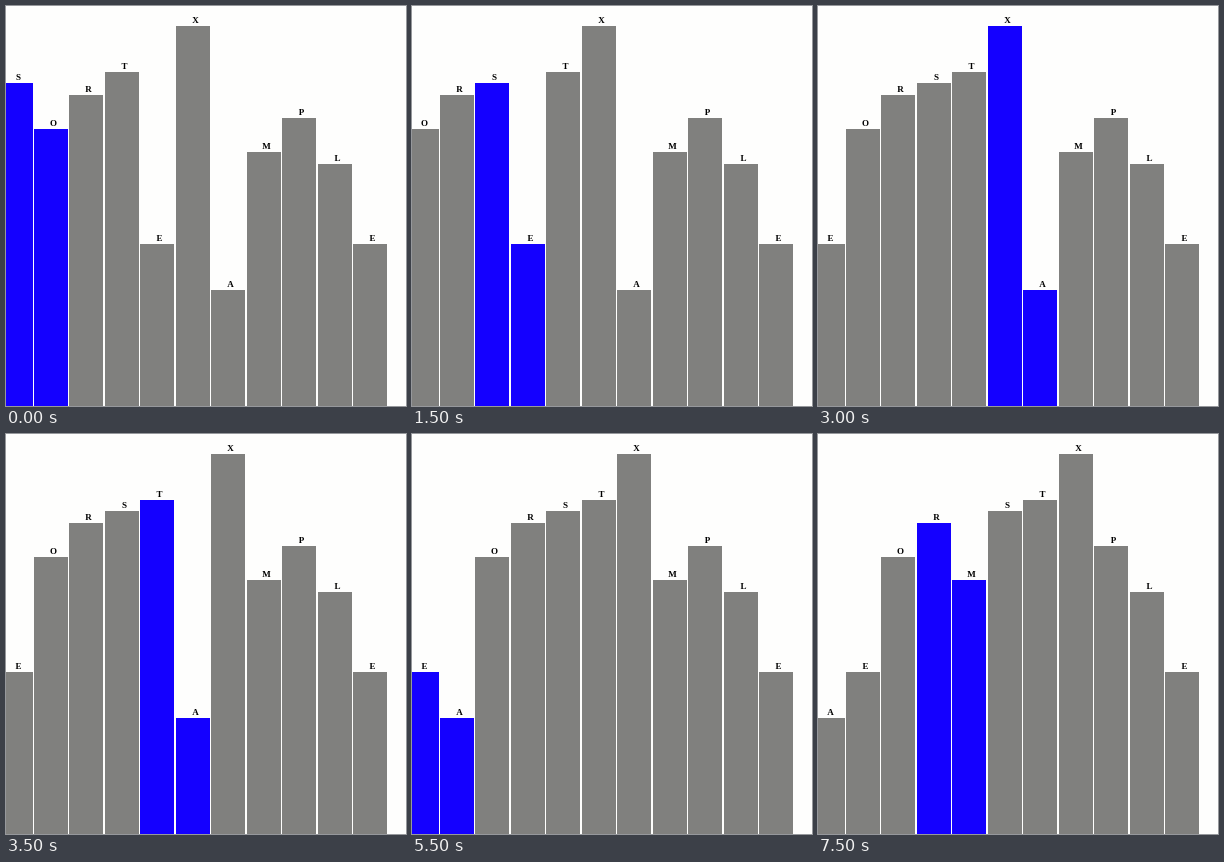
An HTML page with a canvas for the animation above (8 s loop, 400x400 px).

```html
<!DOCTYPE html>
<html lang="en">
<head>
<meta charset="utf-8">
<title>Insertion sort</title>
<style>
  html, body { margin: 0; width: 100%; height: 100%; overflow: hidden; background: #fefefd; }
  canvas { display: block; }
</style>
</head>
<body>
<canvas id="stage" width="400" height="400"></canvas>
<script>
const STEP = 500, STEPS = 16;
const ctx = document.getElementById('stage').getContext('2d');

// Record the row just before each exchange of an insertion sort.
function exchanges(word) {
  const row = [...word], steps = [];
  for (let i = 1; i < row.length; i++) {
    for (let j = i; j > 0 && row[j] < row[j - 1]; j--) {
      steps.push({ row: [...row], left: j - 1 });
      [row[j - 1], row[j]] = [row[j], row[j - 1]];
    }
  }
  return steps.slice(0, STEPS);
}

const steps = exchanges('SORTEXAMPLE');

function draw({ row, left }) {
  ctx.fillStyle = '#fefefd';
  ctx.fillRect(0, 0, 400, 400);
  ctx.font = 'bold 9px "Liberation Serif", serif';
  ctx.textAlign = 'center';
  row.forEach((letter, i) => {
    const x = Math.round(i * 35.45 - 7.45);
    const rank = letter.charCodeAt(0) - 65;
    const top = Math.round(284 - rank * 264 / 23);
    ctx.fillStyle = i === left || i === left + 1 ? '#1400ff' : '#80807e';
    ctx.fillRect(x, top, 34, 400 - top);
    ctx.fillStyle = '#000';
    ctx.fillText(letter, x + 19.5, top - 3);
  });
}

function tick(now) {
  draw(steps[Math.floor(now / STEP) % steps.length]);
  requestAnimationFrame(tick);
}
tick(performance.now());
</script>
</body>
</html>
```
